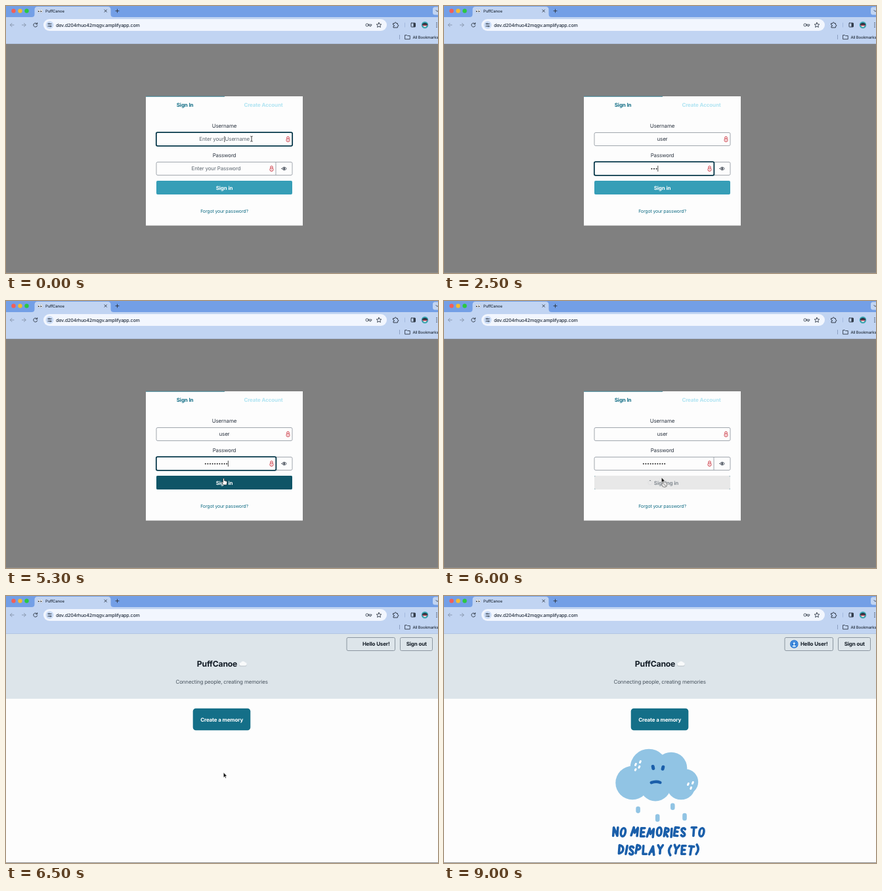
An HTML page that plays this animation: 658 px wide and 408 px high, repeating every 9400 ms.

```html
<!DOCTYPE html>
<html lang="en">
<head>
<meta charset="utf-8">
<title>Sign in</title>
<style>
html, body { margin: 0; width: 100%; height: 100%; overflow: hidden; background: #fff; }
svg { display: block; width: 100%; height: 100%; }
text { font: 8px Inter, sans-serif; letter-spacing: -.022em; text-anchor: middle; fill: #2b3440; text-rendering: geometricPrecision; }
.bold { font-weight: 700; letter-spacing: -.016em; }
.bar { font-size: 6px; font-weight: 500; letter-spacing: -.028em; text-anchor: start; fill: #25303f; }
.hint { fill: #5d6770; }
.icon { fill: none; stroke: #333d4b; stroke-linecap: round; stroke-linejoin: round; }
.box { fill: #fdfdfd; stroke: #969ca4; stroke-width: .9; }
.focus { fill: none; stroke: #06384a; stroke-width: 1.7; }
.caret { stroke: #222; stroke-width: .8; }
</style>
</head>
<body>
<svg viewBox="0 0 658 408">
  <defs>
    <g id="lock" fill="none" stroke="#cc3440" stroke-width="1">
      <path d="M-1.700-.8V-2.200A1.700 1.800 0 0 1 1.700-2.200V-.8"/>
      <rect x="-2.400" y="-.9" width="4.800" height="4.700" rx="1.800"/>
      <path d="M0 .8V2"/>
    </g>
  </defs>

  <!-- browser window -->
  <path fill="#739fe6" d="M0 0H658V20H0Z"/>
  <path fill="#c1d4f2" d="M0 17H39Q43.500 17 43.500 12.500V5.500Q43.500 1 48 1H155Q159.500 1 159.500 5.500V12.500Q159.500 17 164 17H658V58H0Z"/>
  <circle cx="11.500" cy="7.500" r="3.200" fill="#f35f57"/>
  <circle cx="21.500" cy="7.500" r="3.200" fill="#f6bd2e"/>
  <circle cx="31.500" cy="7.500" r="3.200" fill="#2bc840"/>
  <g fill="#fff" stroke="#8e9aab" stroke-width=".4">
    <ellipse cx="50.300" cy="7.700" rx="1.700" ry="2.600"/><ellipse cx="54" cy="7.700" rx="1.700" ry="2.600"/>
  </g>
  <g fill="#222"><circle cx="49.800" cy="8.200" r=".9"/><circle cx="53.500" cy="8.200" r=".9"/></g>
  <text class="bar" x="60" y="9.700">PuffCanoe</text>
  <path class="icon" d="M150 5.800l3.400 3.400m0-3.400l-3.400 3.400M167 7.500h5m-2.500-2.500v5"/>
  <rect x="650" y="1.500" width="14" height="12" rx="3.500" fill="#c1d4f2"/>
  <path class="icon" d="M655 6.500l2 2 2-2"/>
  <path class="icon" style="stroke:#8796ad" d="M12 29H6.500m2.500-2.700L6.300 29 9 31.700M24.500 29H30m-2.500-2.700L30.200 29 27.500 31.700"/>
  <path class="icon" d="M47.300 27.300A3 3 0 1 0 47.700 30M47.700 25.700v2.100h-2.100"/>
  <rect x="57" y="20" width="523" height="18" rx="9" fill="#f2f6fe"/>
  <circle cx="66.500" cy="29" r="6" fill="#cbdcf6"/>
  <path class="icon" d="M63.800 27.300h.8m2 0h2.600M63.800 30.800h2.600m2 0h.8"/>
  <circle class="icon" cx="65.500" cy="27.300" r=".9" stroke-width=".8"/>
  <circle class="icon" cx="67.500" cy="30.800" r=".9" stroke-width=".8"/>
  <text class="bar" x="76" y="31.600" style="font-size:7.200px">dev.d204rhuo42mqgv.amplifyapp.com</text>
  <g class="icon" stroke-width=".8">
    <circle cx="550" cy="29" r="2.100"/>
    <path d="M552.200 28.200h4.600v1.600h-1.200v1.200h-1.500v-1.200h-1.900"/>
  </g>
  <path class="icon" stroke-width=".9" d="M568 25.300l1.100 2.500 2.700.2-2 1.800.6 2.700-2.400-1.400-2.400 1.400.6-2.700-2-1.800 2.700-.2Z"/>
  <path class="icon" d="M590 26.500h2q0-1.600 1.200-1.600t1.200 1.600h2v2.200q1.500 0 1.500 1.200t-1.500 1.200v1.900h-6.400v-2q1.500 0 1.500-1.100t-1.500-1.100Z"/>
  <path stroke="#9db4da" stroke-width=".8" d="M607.500 25.500v7"/>
  <rect class="icon" x="617" y="26" width="6.500" height="6" rx=".6"/>
  <path fill="#333d4b" d="M620.500 26h3v6h-3Z"/>
  <circle cx="638" cy="29" r="5.200" fill="#35a3ae"/>
  <path fill="#283240" d="M634 27.500q4-3.500 8 0v1.500h-8Z"/>
  <path fill="#c9475c" d="M634.500 28.800h7v1.700h-7Z"/>
  <path fill="#f0e9e4" d="M636 30.500h4v1.600h-4Z"/>
  <g fill="#333d4b"><circle cx="656" cy="26" r=".8"/><circle cx="656" cy="29" r=".8"/><circle cx="656" cy="32" r=".8"/></g>
  <path stroke="#7f93b5" stroke-width=".8" d="M599.500 44v7"/>
  <path class="icon" stroke-width=".9" d="M608 44.500h2.500l1 1h3.800v5.200H608Z"/>
  <text class="bar" x="619.500" y="49.600">All Bookmarks</text>
  <path stroke="#a9bbd8" stroke-width=".7" d="M0 57.700H658"/>

  <g id="login">
    <path fill="#808080" d="M0 58H658V408H0Z"/>
    <path fill="#fdfdfd" d="M213 138H452V335.500H213Z"/>
    <path fill="#357f92" d="M213 137.700H333v1H213Z"/>
    <text class="bold" x="272.600" y="154" style="fill:#116d85">Sign In</text>
    <text class="bold" x="392" y="154" style="fill:#b0e4f2">Create Account</text>
    <text x="332.500" y="186">Username</text>
    <rect class="box" x="229" y="193.500" width="207" height="20" rx="2"/>
    <rect class="focus" id="userFocus" x="228.800" y="193.200" width="207.400" height="20.600" rx="2"/>
    <text class="hint" id="userHint" x="332.700" y="206.300">Enter your Username</text>
    <text id="userText" x="332.500" y="206.300"></text>
    <path class="caret" id="userCaret" d="M0 199v9"/>
    <use href="#lock" x="429.500" y="203.500"/>
    <text x="332.500" y="231">Password</text>
    <rect class="box" x="229" y="238.500" width="207" height="20" rx="2"/>
    <path stroke="#969ca4" stroke-width=".9" d="M411 238.500v20"/>
    <rect class="focus" id="passFocus" x="228.800" y="238.200" width="182.600" height="20.600" rx="2"/>
    <text class="hint" id="passHint" x="320" y="251.300">Enter your Password</text>
    <path id="dots" stroke="#222" stroke-width="2" stroke-linecap="round" stroke-dasharray="0 3.600"/>
    <path class="caret" id="passCaret" d="M0 244v9"/>
    <use href="#lock" x="404.500" y="248.500"/>
    <path class="icon" d="M420.200 248.500q3.500-4.600 7 0q-3.500 4.600-7 0Z"/>
    <circle cx="423.700" cy="248.500" r="1.300" fill="#222b36"/>
    <rect x="229" y="267" width="207" height="21" rx="2" fill="#369eb7"/>
    <rect id="hover" x="229" y="267" width="207" height="21" rx="2" fill="#0f5567"/>
    <rect id="disabled" x="229" y="267" width="207" height="21" rx="2" fill="#e8e8e8"/>
    <text class="bold" id="signIn" x="332.500" y="280.500" style="fill:#fff">Sign in</text>
    <g id="signing">
      <circle cx="314" cy="277.500" r="3.200" fill="none" stroke="#e0e1e2" stroke-width="1"/>
      <path id="spinner" fill="none" stroke="#777f86" stroke-width="1" d="M313 274.500a3.200 3.200 0 0 1 2 0"/>
      <text class="bold" x="338.500" y="280.500" style="fill:#858c93">Signing in</text>
    </g>
    <text x="332.500" y="315.600" style="font-size:7px;fill:#116d85">Forgot your password?</text>
  </g>

  <path id="blank" fill="#fdfdfd" d="M0 58H658V408H0Z"/>

  <g id="home">
    <path fill="#dde5ea" d="M0 58H658V157H0Z"/>
    <g fill="none" stroke="#828d98" stroke-width=".9">
      <rect x="519" y="63.500" width="73.500" height="20" rx="2"/>
      <rect x="600.500" y="63.500" width="49" height="20" rx="2"/>
    </g>
    <text class="bold" x="563.800" y="76.400" style="fill:#111a24">Hello User!</text>
    <text class="bold" x="625.300" y="76.400" style="fill:#111a24">Sign out</text>
    <text class="bold" x="321.500" y="107.600" style="font-size:12.200px;fill:#111a24">PuffCanoe</text>
    <path fill="#c3cad0" d="M357.500 107.700a2.300 2.300 0 0 1 0-4.600h6.800a2.300 2.300 0 0 1 0 4.600Z"/>
    <path fill="#f8fafb" d="M357.700 106.400a2.300 2.300 0 0 1 .2-4.600a3.500 3.500 0 0 1 6.300-.2a2.400 2.400 0 0 1 .2 4.800Z"/>
    <text x="328.700" y="134" style="fill:#4b5661">Connecting people, creating memories</text>
    <rect x="284.700" y="171.700" width="87.600" height="33.600" rx="4.500" fill="#146f88"/>
    <text class="bold" x="328.700" y="191.500" style="fill:#fff">Create a memory</text>
  </g>

  <g id="images">
    <circle cx="533.300" cy="73.500" r="6.200" fill="#1b6fd0"/>
    <circle cx="533.300" cy="73.500" r="4.500" fill="none" stroke="#8cc0f2" stroke-width=".8"/>
    <g fill="#c4e0f8">
      <circle cx="533.300" cy="72.300" r="1.900"/>
      <path d="M530.300 76.700q3-4.200 6 0q-3 2.400-6 0Z"/>
    </g>
    <g fill="#91c4e4">
      <circle cx="287" cy="285.500" r="25.700"/>
      <circle cx="312" cy="262" r="28.300"/>
      <circle cx="346" cy="263" r="24.300"/>
      <circle cx="367.700" cy="284" r="19.500"/>
      <circle cx="322" cy="290" r="23.500"/>
      <circle cx="361" cy="289.500" r="21.800"/>
      <path d="M290 262H368V300H290Z"/>
    </g>
    <g fill="none" stroke="#1b5faa" stroke-linecap="round">
      <path stroke-width="5" d="M318.200 260.500l.6 3M333.800 261.200l-.7 3"/>
      <path stroke-width="4.500" d="M315.800 285.200Q323 282.300 329.300 285"/>
    </g>
    <path stroke="#fff" stroke-width="3" stroke-linecap="round" d="M299.300 252.500l-.8 2M292.300 256.500l-.8 2M297.800 260.300l-.8 2M292 264.700l-.7 1.500M372.300 286.500l-.8 2M379.300 284.500l-.8 2M376.500 292.500l-.7 2"/>
    <path stroke="#91c4e4" stroke-width="6.600" stroke-linecap="round" d="M295.600 324.800v3.800M325.200 336.500v5.200M348.300 319.900v3.900M366.500 335v5"/>
    <g id="lettering" role="img" aria-label="No memories to display (yet)" fill="none" stroke="#1b5faa" stroke-width="4" stroke-linecap="round" stroke-linejoin="round"></g>
  </g>

  <path stroke="#8c8c8c" stroke-width="1" d="M0 407.500H658"/>

  <g id="cursor" stroke-linejoin="round">
    <path id="ibeam" fill="none" stroke="#222" stroke-width=".9" d="M-1.700-4Q0-4 0-3V3Q0 4-1.700 4M1.700-4Q0-4 0-3M0 3Q0 4 1.700 4"/>
    <path id="arrow" fill="#111" stroke="#fff" stroke-width=".5" d="M0-.3V7.400L1.800 5.800 2.900 8.500 4.100 8 3 5.300H5.300Z"/>
    <path id="hand" fill="#fff" stroke="#222" stroke-width=".7" d="M-1 5V.8Q0-.6 1 .8V3.500L4.600 4.400Q5.600 4.800 5.200 6.500L4.400 10H-.2L-3 6.400Q-2.600 5-1 6.600Z"/>
    <g id="denied" fill="#e4e4e4" stroke="#858585" stroke-width="1">
      <circle cx="4.500" cy="10.500" r="4"/><path d="M1.700 7.700L7.300 13.300"/>
    </g>
  </g>
</svg>
<script>
const LOOP = 9400, STEP = 100;
const $ = id => document.getElementById(id);
const show = (id, on) => $(id).style.display = on ? '' : 'none';
const fade = (id, amount) => $(id).setAttribute('opacity', amount);
const move = (id, x, y = 0) => $(id).setAttribute('transform', `translate(${x} ${y})`);
const ramp = (t, from, to) => Math.min(1, Math.max(0, (t - from) / (to - from)));
const within = (t, from, to) => t >= from && t < to;

// Hand-lettered capitals: centreline width and stroke, 14 units tall
const GLYPHS = {
  N: [7, 'M0 14V0L7 14V0'], O: [8, 'M4 0C-1 0-1 14 4 14S9 0 4 0'],
  M: [10, 'M0 14 2 0 5 9 9 0 10 14'], E: [6, 'M6 0H0V14H6M0 7H5'],
  R: [6, 'M0 14V0C8 0 8 7 0 7L6 14'], I: [0, 'M0 0V14'],
  S: [6, 'M6 2C4-1 0 0 0 3S6 8 6 11 2 15 0 12'], T: [8, 'M0 0H8M4 0V14'],
  D: [7, 'M0 0V14C9 13 9 1 0 0'], P: [6, 'M0 14V0C8 0 8 8 0 8'],
  L: [6, 'M0 0V14H6'], A: [8, 'M0 14 4 0 8 14M1.5 9H6.5'],
  Y: [8, 'M0 0 4 7 8 0M4 7V14'], '(': [3, 'M3-1Q-3 7 3 15'],
  ')': [3, 'M0-1Q6 7 0 15'], ' ': [0, '']
};

function letter(line, y) {
  const gap = 5.4, size = .9;
  const width = [...line].reduce((sum, c) => sum + GLYPHS[c][0] + gap, -gap);
  let x = -width / 2;
  const paths = [...line].map((c, i) => {
    const [w, d] = GLYPHS[c];
    const tilt = i % 2 ? 6 : 0;
    const path = `<path transform="translate(${x} ${i % 3 - 8}) rotate(${tilt} ${w / 2} 7) skewX(-4)" d="${d}"/>`;
    x += w + gap;
    return path;
  }).join('');
  return `<g transform="translate(327.500 ${y}) scale(${size})">${paths}</g>`;
}
$('lettering').innerHTML = letter('NO MEMORIES TO', 361) + letter('DISPLAY (YET)', 388);

const NAME = 'user';
const nameKeys = [600, 800, 1100, 1100];
const passKeys = [2100, 2300, 2500, 2800, 3000, 3200, 3400, 3600, 3800, 4200];
const typed = (keys, t) => keys.filter(k => k <= t).length;

// time, x, y
const PATH = [
  [0, 374, 203], [4600, 374, 207], [4700, 368, 219], [4900, 352, 250], [5000, 340, 268],
  [5200, 331.5, 271], [5500, 331.5, 271], [5600, 331.3, 270], [7300, 331.3, 270],
  [7500, 352, 280], [7900, 470, 266], [8300, 610, 217], [8400, 646, 203], [LOOP, 646, 203]
];

function pointer(t) {
  const i = PATH.findIndex(p => p[0] > t);
  const [a, b] = [PATH[i - 1], PATH[i]];
  const p = ramp(t, a[0], b[0]);
  return [a[1] + (b[1] - a[1]) * p, a[2] + (b[2] - a[2]) * p];
}

function drawFields(t) {
  const name = NAME.slice(0, typed(nameKeys, t));
  $('userText').textContent = name;
  show('userHint', !name);
  show('userCaret', t < 300 || within(t, 600, 1400));
  move('userCaret', name ? 333 + $('userText').getComputedTextLength() / 2 : 332.8);
  fade('userFocus', 1 - ramp(t, 1300, 1600));

  const count = typed(passKeys, t), pitch = 3.6, left = 320.4 - count * pitch / 2;
  show('passHint', !count);
  show('dots', count);
  $('dots').setAttribute('d', `M${left + 1.4} 248.800h${Math.max(0, count - 1) * pitch + .1}`);
  show('passCaret', within(t, 1400, 1900) || within(t, 2100, 4700) || within(t, 5200, 5400));
  move('passCaret', left + count * pitch);
  fade('passFocus', ramp(t, 1300, 1600) - ramp(t, 5300, 5700));
}

function drawButton(t) {
  fade('hover', ramp(t, 4900, 5200));
  fade('disabled', ramp(t, 5500, 5800));
  show('signIn', t < 5600);
  show('signing', t >= 5600);
  $('spinner').setAttribute('transform', `rotate(${(t - 6000) * .36} 314 277.5)`);
}

function drawCursor(t) {
  const [x, y] = pointer(t);
  const onField = t < 600 || (t < 5600 && within(y, 238, 260));
  const onButton = t < 5600 && y >= 267;
  move('cursor', x, y);
  show('cursor', t < 600 || within(t, 4700, 8500));
  show('ibeam', onField);
  show('hand', onButton);
  show('arrow', !onField && !onButton);
  show('denied', within(t, 5600, 6100));
}

function draw(now) {
  const t = Math.floor(now % LOOP / STEP) * STEP;
  show('login', t < 6100);
  show('blank', t >= 6100);
  show('home', t >= 6500);
  show('images', t >= 6700);
  if (t < 6100) { drawFields(t); drawButton(t); }
  drawCursor(t);
}

const start = performance.now();
function tick() {
  draw(performance.now() - start);
  requestAnimationFrame(tick);
}
tick();
</script>
</body>
</html>
```
